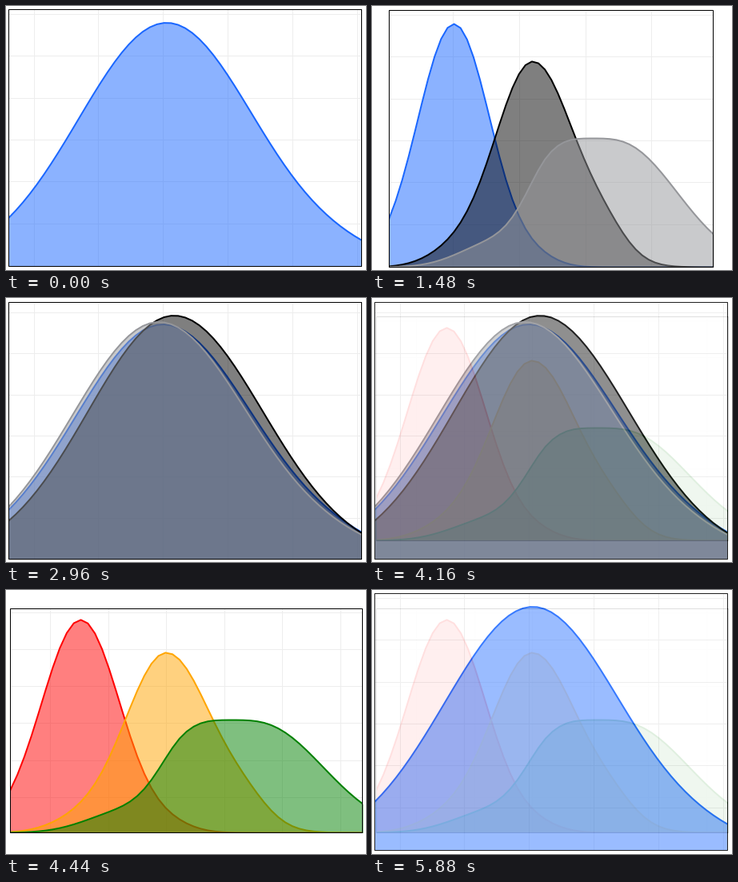
Write a matplotlib script that moves like this. It is 450 px wide and 330 px high and loops after 5920 ms.

```python
import numpy as np
import matplotlib.pyplot as plt
from matplotlib.animation import FuncAnimation
from matplotlib.patches import Rectangle

W, H, DPI = 450, 330, 100
HOLD, FADE = 29, 8
CYCLE = HOLD + FADE
NODES = 51
BLUE, BLACK, GRAY = "#1966ff", "#000000", "#95969a"
GRID = "#ededed"

fig = plt.figure(figsize=(W / DPI, H / DPI), dpi=DPI, facecolor="white")


def px(width):
    return width * 72 / DPI


def stage():
    ax = fig.add_axes([0, 0, 1, 1])
    ax.set_xlim(0, W)
    ax.set_ylim(H, 0)
    ax.axis("off")
    return ax


def bell(x, mid, height, left, right=None):
    """Bell curve with its own width on each side."""
    d = x - mid
    sigma = np.where(d < 0, left, right or left)
    return height * np.exp(-0.5 * (d / sigma) ** 2)


def draw_scene(box, rows, cols, curves):
    """Draw one plot; curves hold a colour, x positions and heights."""
    x0, y0, x1, y1 = box
    ax = stage()
    clip = Rectangle((x0, y0), x1 - x0, y1 - y0, transform=ax.transData)
    for y in np.floor(rows) + 0.5:
        ax.plot([x0, x1], [y, y], color=GRID, lw=px(1), snap=False, zorder=1)
    for x in np.floor(cols) + 0.5:
        ax.plot([x, x], [y0, y1], color=GRID, lw=px(1), snap=False, zorder=1)
    for k, (color, x, height) in enumerate(curves):
        y = y1 - height
        area = ax.fill_between(x, y, y1, color=color, alpha=0.5, lw=0,
                               zorder=2 + k)
        line, = ax.plot(x, y, color=color, lw=px(2), zorder=2.5 + k)
        area.set_clip_path(clip)
        line.set_clip_path(clip)
    ax.add_patch(Rectangle((x0, y0), x1 - x0, y1 - y0, fill=False, ec="black",
                           lw=px(1), joinstyle="miter", snap=False, zorder=9))
    fig.canvas.draw()
    image = np.array(fig.canvas.buffer_rgba())[..., :3].astype(float)
    ax.remove()
    return image


wide = np.linspace(3.5, 444.5, NODES)
inner = np.linspace(21.5, 427, NODES)
stretched = 200 + (inner - 200.5) * 1.087
SQUASH = 0.8755

# Narrow, middle and flat-topped distributions, each a sum of bells.
shapes = [
    bell(inner, 102.5, 304, 45.2, 45) + bell(inner, 208, 7, 25),
    bell(inner, 201, 257, 48, 53) + bell(inner, 98, 13, 33)
    + bell(inner, 294, 21, 27),
    bell(inner, 308, 155, 73) + bell(inner, 222, 62, 30, 36)
    + bell(inner, 142, 20, 40),
]
tail = bell(wide, 420, 8.3, 60)

steps = np.arange(6)
wide_cols = 35 + 80.9 * steps

scenes = [
    draw_scene((3.5, 4.5, 444.5, 325.5), 10.5 + 52.35 * steps, wide_cols,
               [(BLUE, wide, bell(wide, 201, 304.5, 110, 109) + tail)]),
    draw_scene((21.5, 5.5, 426.5, 326.5), 11.5 + 52.35 * steps,
               101.5 + 82.8 * steps[:4],
               [(c, inner, h) for c, h in zip((BLUE, BLACK, GRAY), shapes)]),
    draw_scene((3.5, 5.5, 444.5, 326.5), 18.5 + 51.3 * steps, wide_cols,
               [(BLUE, wide, bell(wide, 196, 293.5, 109, 113) + tail),
                (BLACK, wide, bell(wide, 210, 304.5, 107.5, 111)),
                (GRAY, wide, bell(wide, 191, 296.5, 108, 112) + tail)]),
    draw_scene((5.5, 23.5, 445.5, 303.5), 28.3 + 46.2 * steps,
               55.8 + 72.5 * steps,
               [(c, stretched, h * SQUASH)
                for c, h in zip(("red", "orange", "green"), shapes)]),
]


def frame_image(n):
    k, r = divmod(n, CYCLE)
    t = max(0, r - HOLD) / FADE
    mix = (1 - t) * scenes[k] + t * scenes[(k + 1) % len(scenes)]
    return np.round(mix).astype(np.uint8)


view = stage().imshow(frame_image(0), extent=(0, W, H, 0), aspect="auto",
                      interpolation="nearest")


def update(n):
    view.set_data(frame_image(n))
    return [view]


anim = FuncAnimation(fig, update, frames=CYCLE * len(scenes), interval=40,
                     init_func=lambda: update(0), repeat=True, repeat_delay=0)
plt.show()
```
